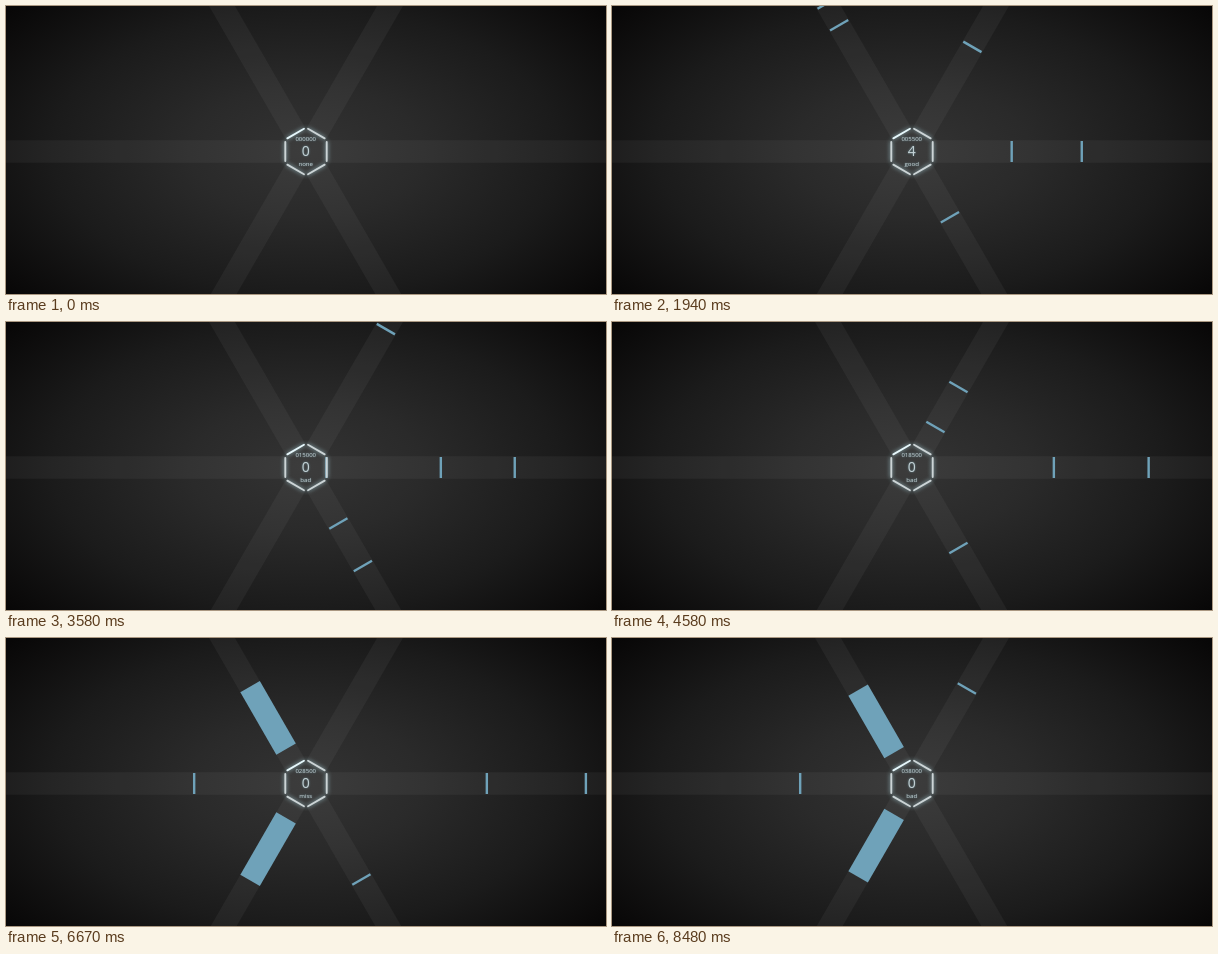
An HTML page with a canvas for the animation above (8.51 s loop, 600 by 288 pixels).

```html
<!DOCTYPE html>
<html lang="en">
<head>
<meta charset="utf-8">
<title>Hex rhythm</title>
<style>
  html, body { margin: 0; width: 100%; height: 100%; overflow: hidden; background: #080808; }
  canvas { display: block; width: 600px; height: 288px; }
</style>
</head>
<body>
<canvas id="stage" width="600" height="288"></canvas>
<script>
const ctx = document.getElementById('stage').getContext('2d');
const W = 600, H = 288, LOOP = 8510;
const CX = 300, CY = 145.5;
const SPEED = 0.213;      // px per ms towards the centre
const HIT = 19;           // distance at which a note is judged
const LANE_WIDTH = 22.5;
const NOTE_COLOR = '#6fa2b9';
const VERDICTS = { 0: 'miss', 500: 'bad', 1000: 'good', 2000: 'great' };

// Lanes run clockwise from the right.
const R = 0, LR = 1, LL = 2, L = 3, UL = 4, UR = 5;

// lane, time of arrival at the centre, points, length of a held note
const notes = [
  [R, 1617, 500], [UR, 1730, 1000], [UL, 1844, 2000], [LL, 1844, 1000], [LR, 1957, 1000],
  [LR, 2297, 1000], [R, 2409, 2000], [UR, 2508, 1000], [UL, 2625, 1000],
  [R, 2738, 2000], [UL, 2743, 1000],
  [LR, 2976, 500], [UR, 3203, 500], [LR, 3430, 500],
  [R, 3677, 500], [LR, 3885, 500], [LR, 4115, 500], [R, 4214, 500], [UR, 4331, 500],
  [UL, 4448, 500], [LL, 4555, 0], [R, 4561, 500],
  [UR, 4801, 2000], [LR, 5017, 500], [UR, 5017, 2000], [R, 5247, 2000],
  [R, 5692, 2000], [LR, 5927, 1000], [R, 6152, 500], [LR, 6376, 0],
  [UL, 6858, 1000, 72], [LL, 6858, 1000, 72], [LR, 7191, 1000], [L, 7196, 2000],
  [R, 7520, 1000], [UR, 7750, 2000], [R, 7985, 1000], [UR, 8203, 500],
  [UL, 8649, 1000, 72], [LL, 8649, 1000, 72], [UR, 8996, 1000], [L, 9006, 2000]
].map(([lane, arrival, points, length = 0]) => ({ lane, arrival, points, length }));

function onLane(lane, draw) {
  ctx.save();
  ctx.translate(CX, CY);
  ctx.rotate(lane * Math.PI / 3);
  draw();
  ctx.restore();
}

function drawBackground() {
  ctx.fillStyle = '#080707';
  ctx.fillRect(0, 0, W, H);
  ctx.save();
  ctx.translate(CX, CY);
  ctx.scale(1, 0.56);
  const glow = ctx.createRadialGradient(0, 0, 0, 0, 0, 390);
  glow.addColorStop(0, '#333333');
  glow.addColorStop(0.3, '#2a2a2a');
  glow.addColorStop(0.65, '#1b1b1b');
  glow.addColorStop(1, '#080707');
  ctx.fillStyle = glow;
  ctx.fillRect(-300, -270, 600, 540);
  ctx.restore();

  ctx.beginPath();
  for (let lane = 0; lane < 3; lane++) {
    const x = 320 * Math.cos(lane * Math.PI / 3);
    const y = 320 * Math.sin(lane * Math.PI / 3);
    ctx.moveTo(CX - x, CY - y);
    ctx.lineTo(CX + x, CY + y);
  }
  ctx.strokeStyle = 'rgba(255,255,255,0.043)';
  ctx.lineWidth = LANE_WIDTH;
  ctx.stroke();
}

function drawNote(note, time) {
  const near = (note.arrival - time) * SPEED;
  const far = near + note.length;
  if (far < HIT || near > 320) return;
  ctx.fillStyle = NOTE_COLOR;
  onLane(note.lane, () => {
    if (note.length) {
      const start = Math.max(near, HIT);
      ctx.fillRect(start, -LANE_WIDTH / 2, far - start, LANE_WIDTH);
    } else {
      ctx.fillRect(near - 1.2, -10.5, 2.4, 21);
    }
  });
}

function drawHexagon() {
  ctx.lineWidth = 1.9;
  ctx.lineCap = 'round';
  ctx.shadowColor = '#9fc4cc';
  ctx.shadowBlur = 4;
  for (let side = 0; side < 6; side++) {
    ctx.strokeStyle = side === UL ? '#e6f7fb' : '#ccd4d6';
    onLane(side, () => {
      ctx.beginPath();
      ctx.moveTo(20.7, -9.6);
      ctx.lineTo(20.7, 9.6);
      ctx.stroke();
    });
  }
  ctx.shadowBlur = 0;
}

function drawLabel(text, size, baseline) {
  ctx.font = `${size}px "Open Sans", "Noto Sans", sans-serif`;
  ctx.fillText(text, CX - 0.3, baseline);
}

function drawStatus(time) {
  let score = 0, combo = 0, verdict = 'none';
  for (const { arrival, points } of notes) {
    if ((arrival - time) * SPEED > HIT) continue;
    score += points;
    combo = points > 500 ? combo + 1 : 0;
    verdict = VERDICTS[points];
  }
  ctx.textAlign = 'center';
  ctx.fillStyle = '#c3d0d4';
  ctx.shadowColor = '#6f939c';
  ctx.shadowBlur = 2;
  drawLabel(String(score).padStart(6, '0'), 6, 135);
  drawLabel(combo, 14, 150);
  drawLabel(verdict, 6.1, 160);
  ctx.shadowBlur = 0;
}

function render(now) {
  const time = now % LOOP;
  drawBackground();
  for (const note of notes) drawNote(note, time);
  drawHexagon();
  drawStatus(time);
}

const startTime = performance.now();
function tick() {
  render(performance.now() - startTime);
  requestAnimationFrame(tick);
}
tick();
</script>
</body>
</html>
```
